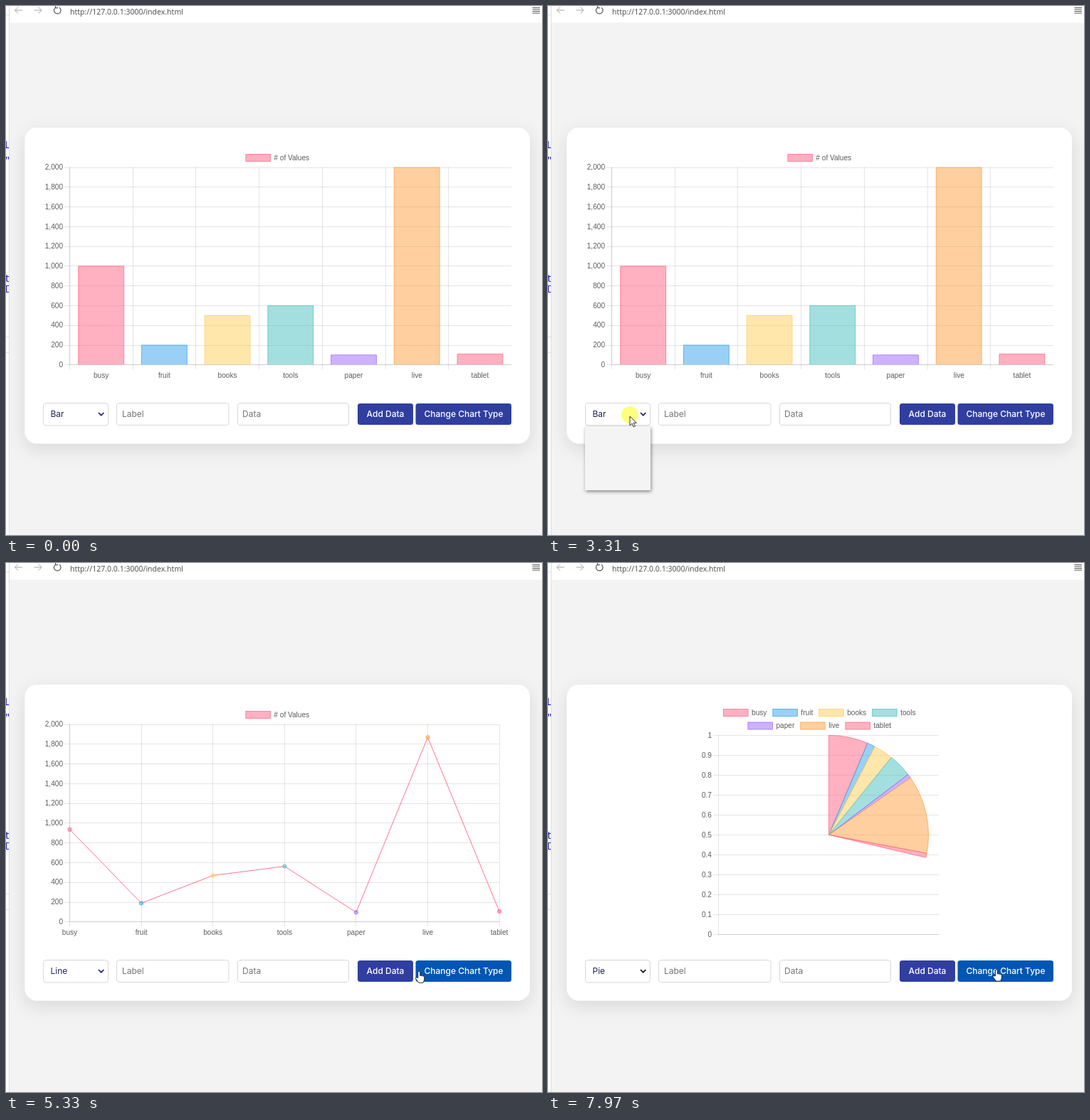
An HTML page that plays this animation: 753 by 744 pixels, repeating every 8000 ms.

```html
<!DOCTYPE html>
<html lang="en">
<head>
<meta charset="utf-8">
<title>Chart type demo</title>
<style>
html, body { margin: 0; width: 100%; height: 100%; overflow: hidden; background: #f3f3f3; }
svg { display: block; width: 100%; height: 100%; }
.ui { font: 12px Inter, "Open Sans", sans-serif; }
.btn { font-weight: 500; fill: #fff; text-anchor: middle; }
.hint { fill: #757575; }
.chart { font: 10.1px "Liberation Sans", Arial, sans-serif; fill: #5c5c5c; }
.url { font: 10.5px "Noto Sans", "Open Sans", sans-serif; fill: #555; }
.code { font: 15px "Noto Sans", sans-serif; fill: #1c1cb8; }
.field { fill: #fff; stroke: #d8d8d8; }
</style>
</head>
<body>
<svg viewBox="0 0 753 744" preserveAspectRatio="none">
  <defs>
    <filter id="soft" x="-10%" y="-10%" width="120%" height="130%">
      <feDropShadow dx="0" dy="8" stdDeviation="12" flood-color="#000" flood-opacity=".11"/>
    </filter>
    <filter id="drop" x="-20%" y="-20%" width="140%" height="140%">
      <feDropShadow dx="1" dy="2" stdDeviation="2.5" flood-color="#000" flood-opacity=".45"/>
    </filter>
    <clipPath id="edge"><rect width="4" height="744"/></clipPath>
  </defs>

  <rect width="753" height="744" fill="#f3f3f3"/>
  <rect width="753" height="23.5" fill="#fff"/>
  <rect width="4" height="744" fill="#fff"/>
  <path d="M4.5 0V744M0 12.5H4M0 465.5H4M0 487.5H4" stroke="#dedede"/>
  <g class="code" clip-path="url(#edge)">
    <text x="-2" y="200">L</text><text x="-1" y="222">"</text>
    <text x="-1" y="388">t</text>
    <path d="M4 393.5H.5V402.5H4" fill="none" stroke="#1c1cb8"/>
  </g>
  <g fill="none" stroke="#a5a5a5">
    <path d="M23 6H12.5M17 1.5L12.5 6L17 10.5M39.5 6H50M45.5 1.5L50 6L45.5 10.5"/>
    <path d="M69.5 2.2A4.8 4.8 0 1 0 75 2.2M69.5 -1V2.7H73" stroke="#555" stroke-width="1.2"/>
    <path d="M739.5 2.5H750M739.5 5H750M739.5 7.5H750M739.5 10H750" stroke="#555"/>
  </g>
  <text class="url" x="90" y="12">http://127.0.0.1:3000/index.html</text>

  <rect x="26.5" y="171" width="709.5" height="444.5" rx="17" fill="#fff" filter="url(#soft)"/>
  <g id="chart" class="chart"></g>

  <g class="ui">
    <rect class="field" x="52.5" y="558.5" width="91" height="31.5" rx="3.5"/>
    <text id="kind" x="62.5" y="578" fill="#20264f"></text>
    <path id="chevron" d="M130 572L133.7 575.7L137.4 572" fill="none" stroke-width="1.7"/>
    <rect class="field" x="155.5" y="558.5" width="157.5" height="31" rx="3.5"/>
    <text class="hint" x="163" y="578">Label</text>
    <rect class="field" x="325.5" y="558.5" width="156" height="31" rx="3.5"/>
    <text class="hint" x="332" y="578">Data</text>
    <rect id="add" x="494" y="559" width="78" height="30" rx="3.5"/>
    <text class="btn" x="533" y="578">Add Data</text>
    <rect id="change" x="575.5" y="559" width="134.5" height="30" rx="3.5"/>
    <text class="btn" x="643" y="578">Change Chart Type</text>
    <g id="popup"></g>
  </g>

  <g id="pointer">
    <circle id="press" cy="-2" r="12" fill="#ff0" fill-opacity=".5"/>
    <path id="arrow" d="M0 0V13L3.2 10.2L5.3 15L7.4 14L5.3 9.4H9.3Z" fill="#fff" stroke="#222" stroke-width=".9"/>
    <path id="hand" d="M-1.5 9V1.2Q-1.5 0 0 0T1.4 1.2V6Q2.5 5 3.6 6.2Q4.8 5.4 5.6 6.7Q7.4 6.2 7.4 8V11.5L5.8 16H-.5L-5 9.8Q-4.5 7.8-2.8 8.8Z" fill="#fff" stroke="#222" stroke-width=".9" stroke-linejoin="round"/>
    <path id="beam" d="M-2.5 -6.5H2.5M0 -6.5V6.5M-2.5 6.5H2.5" fill="none" stroke="#222"/>
  </g>
</svg>
<script>
const LOOP = 8000, GROW = 1000, HOLD = 80;
const data = { busy: 1000, fruit: 200, books: 500, tools: 600, paper: 100, live: 2000, tablet: 110 };
const labels = Object.keys(data), values = Object.values(data);
const total = values.reduce((a, b) => a + b);
const colors = ['255,99,132', '54,162,235', '255,206,86', '75,192,192', '153,102,255', '255,159,64'];
const types = ['Bar', 'Line', 'Pie', 'Doughnut', 'Radar'];

// Moments at which the mouse button is released
const clicks = [1860, 3345, 3960, 4840, 6290, 6950, 7890];
const [barAt, openLine, pickLine, lineAt, openPie, pickPie, pieAt] = clicks;

// Pointer moves: start, end, target x, target y
const entry = [565, 740];
const moves = [
  [250, 680, 545, 575], [680, 1010, 615, 568],
  [2690, 3240, 115, 577], [3560, 3800, 95, 616],
  [3960, 4400, 560, 601], [4400, 4650, 606, 574],
  [5220, 6010, 127, 581], [6300, 6500, 108, 636],
  [6950, 7500, 570, 602], [7500, 7750, 630, 572]
];

const $ = id => document.getElementById(id);
const show = (id, on) => $(id).style.display = on ? '' : 'none';
const clamp = u => Math.min(1, Math.max(0, u));
const easeOut = u => 1 - (1 - clamp(u)) ** 4;
const easeInOut = u => u * u * (3 - 2 * u);
const crisp = v => Math.round(v) + .5;
const pen = document.createElement('canvas').getContext('2d');
pen.font = '10.1px "Liberation Sans", Arial, sans-serif';

function paint(i) {
  const c = colors[i % colors.length];
  return `fill="rgba(${c},.5)" stroke="rgba(${c},.85)" stroke-width=".85"`;
}
const text = (s, x, y, anchor = 'start') =>
  `<text x="${x}" y="${y + 3.6}" text-anchor="${anchor}">${s}</text>`;
const rule = d => `<path d="${d}" fill="none" stroke="#000" stroke-opacity=".1"/>`;

// One centred row of colour keys
function legend(names, y, first = 0) {
  const box = 34.5, pad = 5, gap = 8.5;
  const widths = names.map(s => box + pad + pen.measureText(s).width);
  let x = 381.5 - (widths.reduce((a, b) => a + b) + gap * (names.length - 1)) / 2;
  return names.map((s, i) => {
    const key = `<rect x="${x}" y="${y - 4.5}" width="${box}" height="10" ${paint(first + i)}/>` +
      text(s, x + box + pad, y);
    x += widths[i] + gap;
    return key;
  }).join('');
}

function grid(left, right, top, bottom, name) {
  let out = '', d = '';
  for (let i = 0; i <= 10; i++) {
    const y = top + (bottom - top) * i / 10;
    d += `M${left - 7} ${crisp(y)}H${right}`;
    out += text(name(10 - i), left - 9, y, 'end');
  }
  return rule(d) + rule(`M${left + .5} ${top}V${crisp(bottom)}H${right}`) + out;
}

const LEFT = 89, TOP = 226.6, BASE = 504.3;
const height = (v, p) => (BASE - TOP) * v / 2000 * p;

function valueGrid(right, step) {
  let d = '';
  for (let i = 0; i < labels.length; i++) d += `M${crisp(LEFT + step * i)} ${TOP}V511`;
  return grid(LEFT, right, TOP, BASE, n => (n * 200).toLocaleString('en-US')) +
    rule(d) + legend(['# of Values'], 213);
}

function bars(p) {
  const step = 621 / 7, w = step * .72;
  return valueGrid(710, step) + values.map((v, i) => {
    const x = LEFT + .3 + step * (i + .5), l = x - w / 2, r = x + w / 2;
    return `<path d="M${l} ${BASE}V${BASE + .4 - height(v, p)}H${r}V${BASE}" ${paint(i)}/>` +
      text(labels[i], x, 519.5, 'middle');
  }).join('');
}

function lines(p) {
  const step = 100.6;
  const pts = values.map((v, i) => [LEFT + .5 + step * i, BASE - height(v, p)]);
  return valueGrid(693, step) +
    `<polyline points="${pts.join(' ')}" fill="none" stroke="rgb(${colors[0]})" stroke-width=".9"/>` +
    pts.map(([x, y], i) => `<circle cx="${x}" cy="${y}" r="2.7" ${paint(i)}/>` +
      text(labels[i], x, 519.5, 'middle')).join('');
}

function pie(p) {
  const cx = 394.5, cy = 382.3, r = 140;
  const at = a => `${cx + r * Math.sin(a)} ${cy - r * Math.cos(a)}`;
  let from = 0;
  return grid(239, 549, 242, 522, n => n / 10) + values.map((v, i) => {
    const to = from + 2 * Math.PI * p * v / total;
    const slice = `<path d="M${cx} ${cy}L${at(from)}A${r} ${r} 0 0 1 ${at(to)}Z" ${paint(i)} stroke-linejoin="bevel"/>`;
    from = to;
    return slice;
  }).join('') + legend(labels.slice(0, 4), 210) + legend(labels.slice(4), 228.5, 4);
}

function pointerAt(t) {
  let [x, y] = entry;
  for (const [start, end, toX, toY] of moves) {
    const u = easeInOut(clamp((t - start) / (end - start)));
    x += (toX - x) * u;
    y += (toY - y) * u;
  }
  return [x, y];
}

function popup(t, y, chosen) {
  const release = t < pickLine ? openLine : openPie;
  const pick = t < pickLine ? pickLine : pickPie;
  if (t < release - HOLD || t >= pick) return '';
  const blank = t < release, rowH = 18;
  const row = y > 591 ? Math.floor((y - 591) / rowH) : chosen;
  const sheet = `<rect x="52" y="591" width="92" height="90" fill="${blank ? '#f4f4f4' : '#fff'}" filter="url(#drop)"/>`;
  return sheet + (blank ? '' : types.map((s, i) => {
    const top = 591 + rowH * i, on = i === row;
    return (on ? `<rect x="52" y="${top}" width="92" height="${rowH}" fill="#1967d2"/>` : '') +
      `<text x="56" y="${top + 13.3}" fill="${on ? '#fff' : '#222'}">${s}</text>`;
  }).join(''));
}

function draw(t) {
  const grown = since => easeOut((t - since) / GROW);
  $('chart').innerHTML =
    t >= pieAt ? pie(grown(pieAt)) :
    t >= lineAt ? lines(grown(lineAt)) :
    bars(t >= barAt ? grown(barAt) : 1);

  const chosen = t >= pickPie ? 2 : t >= pickLine ? 1 : 0;
  $('kind').textContent = types[chosen];
  $('chevron').setAttribute('stroke', chosen === 2 ? '#111' : '#1a237e');

  const [x, y] = pointerAt(t);
  const over = (a, b) => y >= 559 && y <= 589 && x >= a && x <= b;
  const onAdd = over(494, 572), onChange = over(575.5, 710);
  const onInput = over(155, 313) || over(325, 482);
  $('add').setAttribute('fill', onAdd ? '#0056b3' : '#303f9f');
  $('change').setAttribute('fill', onChange ? '#0056b3' : '#303f9f');
  $('popup').innerHTML = popup(t, y, chosen);

  show('pointer', t >= moves[0][0]);
  $('pointer').setAttribute('transform', `translate(${x} ${y})`);
  show('press', clicks.some(c => t >= c - HOLD && t < c));
  show('hand', onAdd || onChange);
  show('beam', onInput);
  show('arrow', !(onAdd || onChange || onInput));
}

const start = performance.now();
function loop() {
  draw((performance.now() - start) % LOOP);
  requestAnimationFrame(loop);
}
loop();
</script>
</body>
</html>
```
